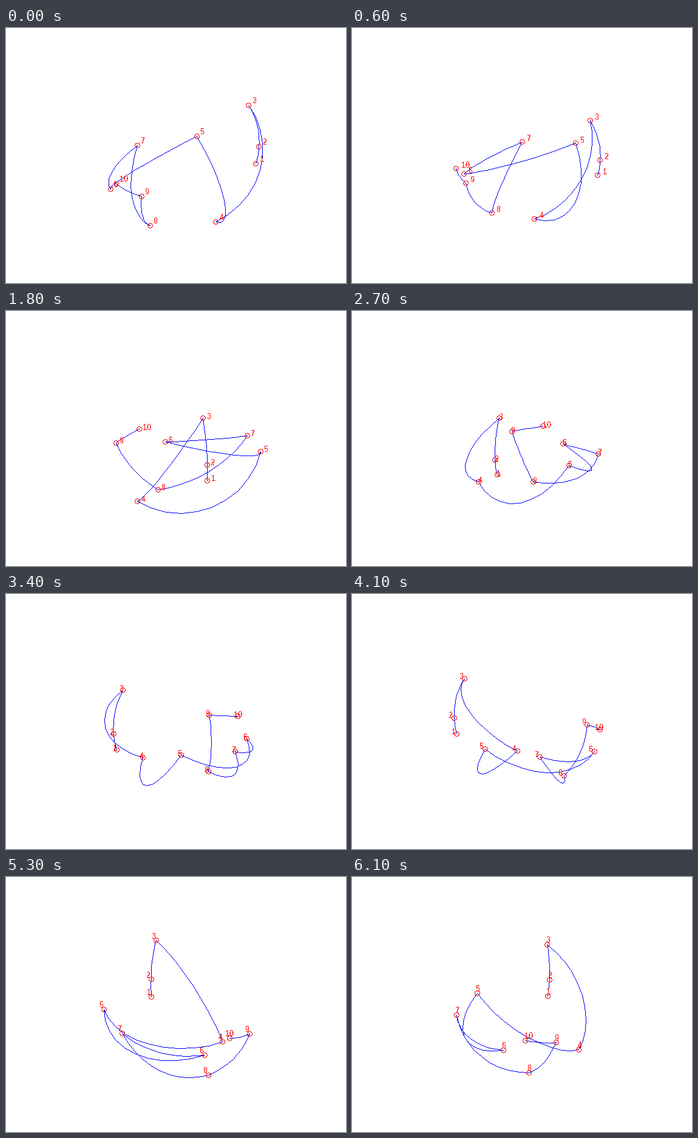
Recreate the animation shown at these times as a matplotlib script. Size 560 by 420 pixels, loop 6.2 s.

```python
import numpy as np
import matplotlib.pyplot as plt
from matplotlib.animation import FuncAnimation

W, H, DPI = 560, 420, 96
FRAMES, STEP_DEG = 62, 5
CENTER = np.array([289.6, 202.6])
BOX_HEIGHT = 0.815 * H          # height the rotating cube has to fit
ELEV = np.radians(20)
LABEL_SHIFT = 0.05
WHITE, BLUE, RED = (255, 255, 255), (0, 0, 255), (255, 0, 0)

plt.rcParams.update({
    "font.family": "Liberation Sans",
    "text.hinting": "native",
    "text.hinting_factor": 1,
})


def on_sphere(lon, lat):
    lon, lat = np.radians([lon, lat])
    return np.array([np.cos(lat) * np.cos(lon),
                     np.cos(lat) * np.sin(lon),
                     np.sin(lat)])


# Stops of the tour as longitude and latitude in degrees.
points = np.array([on_sphere(*stop) for stop in (
    (18.8, -16), (18, -3.1), (17.4, 30.7), (-52.9, -46.5), (79.4, -9.1),
    (193.2, -24.9), (124.4, -12.6), (216.7, -60.4), (238.5, -17.2),
    (213, -13.3))])


def great_arc(a, b, segments=10):
    """Points evenly spaced along the great circle from a to b."""
    angle = np.arccos(a @ b)
    t = np.linspace(0, 1, segments + 1)[:, None]
    return (np.sin((1 - t) * angle) * a + np.sin(t * angle) * b) / np.sin(angle)


def project(xyz, az):
    """Orthographic view, scaled so the unit cube fills the axes height."""
    c, s = np.cos(az), np.sin(az)
    ce, se = np.cos(ELEV), np.sin(ELEV)
    scale = BOX_HEIGHT / (2 * ce + 2 * se * (abs(c) + abs(s)))
    x, y, z = xyz.T
    right = x * c + y * s
    up = z * ce + se * (y * c - x * s)
    return CENTER + scale * np.column_stack([right, -up])


def to_pixel(xy):
    return np.round(xy).astype(int)


def draw_line(canvas, start, end, color):
    """Crisp line, one pixel wide in its shorter direction."""
    count = np.abs(end - start).max() + 1
    x, y = to_pixel(np.linspace(start, end, count)).T
    canvas[y, x] = color


path = np.vstack([great_arc(a, b) for a, b in zip(points[:-1], points[1:])])

turn = np.linspace(0, 2 * np.pi, 24, endpoint=False)
ring = to_pixel(4 * np.column_stack([np.cos(turn), np.sin(turn)]))

fig = plt.figure(figsize=(W / DPI, H / DPI), dpi=DPI, facecolor="white")
ax = fig.add_axes([0, 0, 1, 1])
ax.axis("off")

canvas = np.full((H, W, 3), WHITE, dtype=np.uint8)
picture = ax.imshow(canvas, extent=(0, W, H, 0), aspect="auto",
                    interpolation="nearest")
labels = [
    ax.text(0, 0, str(n), color="#ff0000", fontsize=10,
            ha="left", va="baseline", antialiased=False)
    for n in range(1, len(points) + 1)
]


def draw(frame):
    az = np.radians(STEP_DEG * frame)
    canvas[:] = WHITE
    nodes = to_pixel(project(path, az))
    for start, end in zip(nodes[:-1], nodes[1:]):
        draw_line(canvas, start, end, BLUE)
    for spot in to_pixel(project(points, az)):
        x, y = (spot + ring).T
        canvas[y, x] = RED
    picture.set_data(canvas)
    for label, (x, y) in zip(labels, project(points + LABEL_SHIFT, az)):
        label.set_position((x, y + 5.5))
    return [picture, *labels]


anim = FuncAnimation(fig, draw, frames=FRAMES, interval=100,
                     repeat=True, repeat_delay=0)
plt.show()
```
